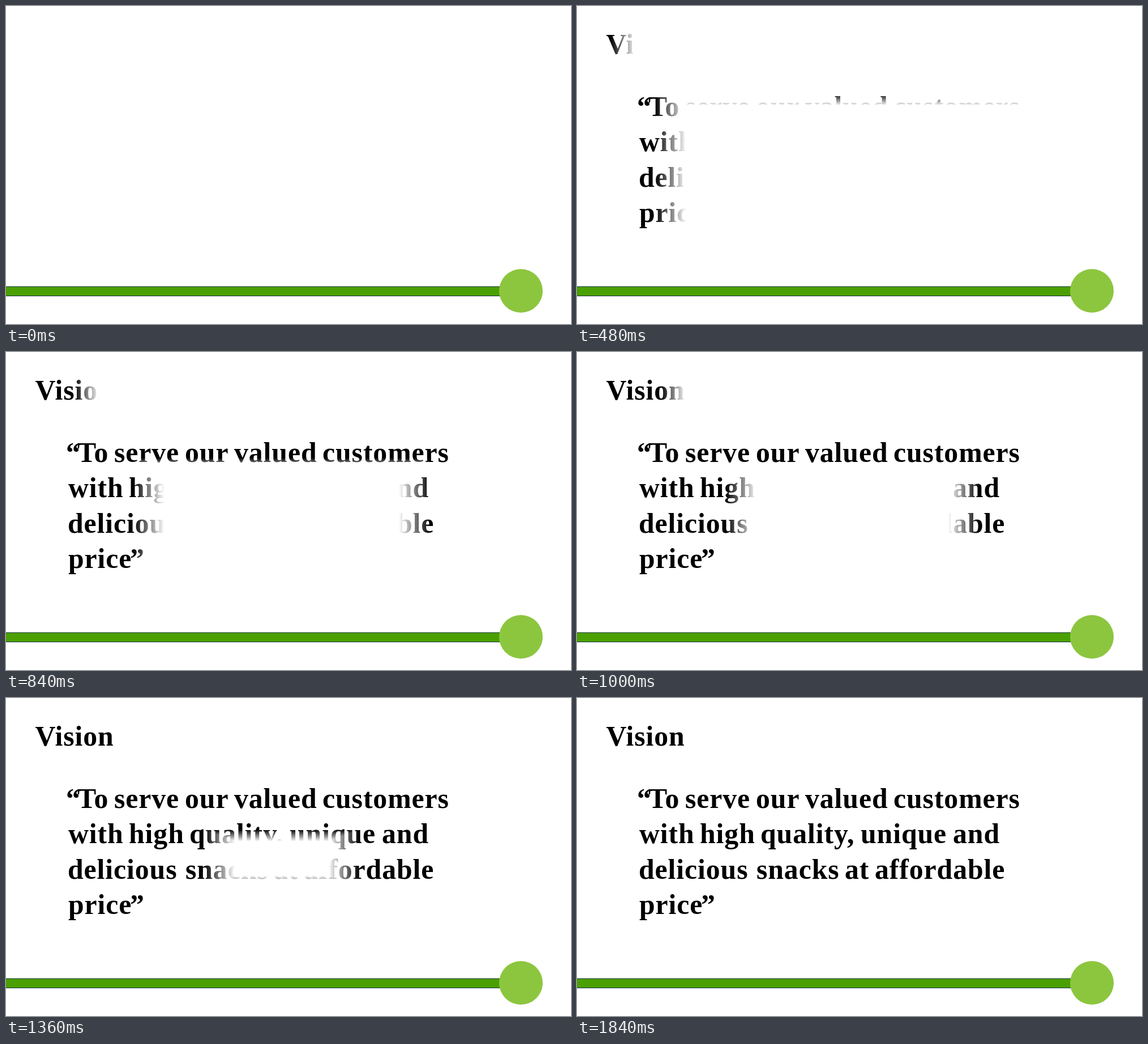
Recreate the animation shown at these times as an HTML page with a canvas. Size 998 by 561 pixels, loop 2000 ms.

```html
<!DOCTYPE html>
<html lang="en">
<head>
<meta charset="utf-8">
<title>Vision</title>
<style>
  html, body { margin: 0; width: 100%; height: 100%; overflow: hidden; background: #fff; }
  svg, canvas { position: absolute; left: 0; top: 0; width: 998px; height: 561px; }
</style>
</head>
<body>
<svg viewBox="0 0 998 561">
  <rect x="-2" y="495" width="912" height="16.5" fill="#4aa003" stroke="#1c3448"/>
  <circle cx="909.5" cy="502.5" r="38.5" fill="#8cc63f"/>
</svg>
<canvas width="998" height="561"></canvas>
<script>
const ctx = document.querySelector('canvas').getContext('2d');
const LOOP = 2000, STEP = 40, START = 160, END = 1840;

// Each line: baseline, then [x, word] pairs.
const lines = [
  [84, [[51.5, 'Vision']]],
  [193.5, [[106, '“'], [126, 'To'], [191, 'serve'], [316, 'our'], [403, 'valued'], [559, 'customers']]],
  [256, [[110, 'with'], [217, 'high'], [324, 'quality,'], [501, 'unique'], [664, 'and']]],
  [318.5, [[109, 'delicious'], [317, 'snacks'], [473, 'at'], [526, 'affordable']]],
  [380.5, [[110, 'price'], [219, '”']]]
];

const grey = v => `rgb(${Array(3).fill(Math.round(255 * v))})`;

function drawText() {
  ctx.fillStyle = '#000';
  ctx.font = 'bold 49.8px "Liberation Serif", serif';
  ctx.letterSpacing = '0.9px';
  for (const [y, words] of lines)
    for (const [x, word] of words) ctx.fillText(word, x, y);
}

// Soft wipe from the left over the title.
function wipeTitle(t) {
  const edge = 50 + 0.17 * (t - START);
  const fade = ctx.createLinearGradient(edge - 45, 0, edge, 0);
  fade.addColorStop(0, '#000');
  fade.addColorStop(1, '#fff');
  ctx.fillStyle = fade;
  ctx.fillRect(0, 0, 998, 110);
}

// Soft rectangular hole shrinking towards the middle of the paragraph.
function closeBox(t) {
  const cx = 487, cy = 283, speedX = 0.24, speedY = 0.088, closed = 1705, fade = 230;
  for (let i = 0; i <= 64; i++) {
    const whiteness = i / 64;
    const age = closed - t + fade * (1 - whiteness);
    if (age <= 0) break;
    const w = age * speedX, h = age * speedY;
    const top = Math.max(110, cy - h);
    ctx.fillStyle = grey(whiteness);
    ctx.fillRect(cx - w, top, 2 * w, cy + h - top);
  }
}

function render(t) {
  ctx.clearRect(0, 0, 998, 561);
  if (t < START) return;
  drawText();
  if (t >= END) return;
  ctx.globalCompositeOperation = 'source-atop';
  wipeTitle(t);
  closeBox(t);
  ctx.globalCompositeOperation = 'source-over';
}

const origin = performance.now();
function tick() {
  const t = Math.max(0, performance.now() - origin) % LOOP;
  render(Math.floor(t / STEP) * STEP);
  requestAnimationFrame(tick);
}
tick();
</script>
</body>
</html>
```
